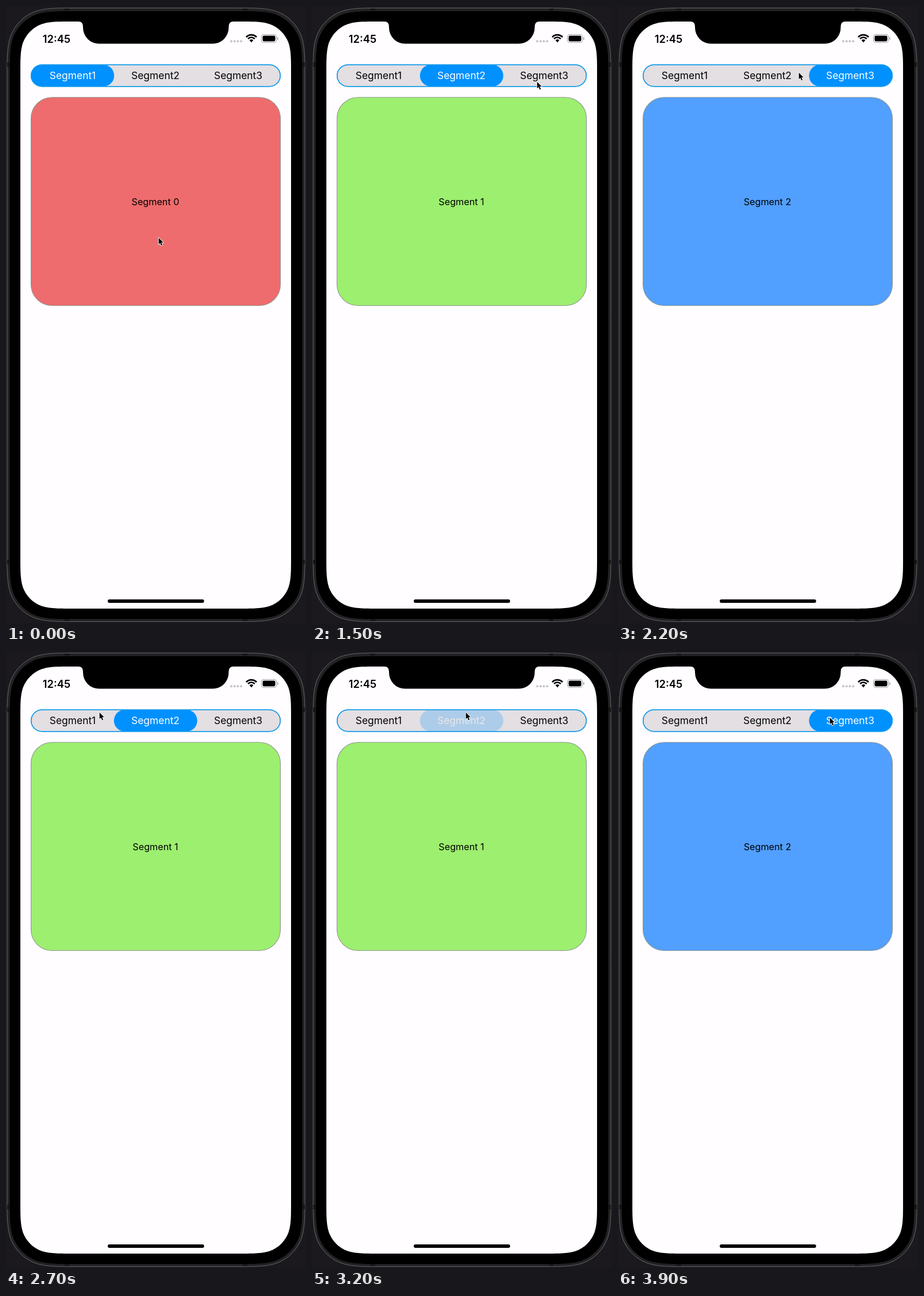
An HTML page with a canvas that plays this animation: 522 by 1072 pixels, repeating every 4000 ms.

```html
<!DOCTYPE html>
<html lang="en">
<head>
<meta charset="utf-8">
<title>Segmented control</title>
<style>
  html, body { margin: 0; width: 100%; height: 100%; overflow: hidden; background: #1b191e; }
  canvas { display: block; width: 522px; height: 1072px; }
</style>
</head>
<body>
<canvas id="stage" width="522" height="1072"></canvas>
<script>
const ctx = document.getElementById('stage').getContext('2d');
const LOOP = 4000, STEP = 100;
const FONT = 'Inter, Roboto, sans-serif';
const BAR = [227, 223, 226], BLUE = [0, 145, 255], WHITE = [255, 255, 255], BLACK = [0, 0, 0];
const PANELS = ['#ee6c6d', '#9def6f', '#519fff'];

// A press dims the button; releasing it selects the tab and fades it back in.
const clicks = [
  { press: 1100, release: 1200, tab: 1 },
  { press: 1600, release: 1700, tab: 2 },
  { press: 2300, release: 2400, tab: 1 },
  { press: 2800, release: 2900, tab: 0 },
  { press: 3100, release: 3200, tab: 1 },
  { press: 3500, release: 3600, tab: 2 }
];
const DIM = 0.24, FADE = 300;

// Pointer path: time, x, y
const path = [
  [0, 265, 402], [300, 300, 282], [600, 332, 152], [1000, 285, 130],
  [1200, 284, 129], [1500, 391, 131], [1700, 397, 129], [1900, 392, 124],
  [2200, 314, 115], [2400, 284, 114], [2700, 162, 106], [2900, 136, 108],
  [3200, 267, 106], [3600, 366, 114], [3900, 368, 115], [4000, 368, 115]
];

function paint(fill, stroke, width = 1) {
  if (fill) { ctx.fillStyle = fill; ctx.fill(); }
  if (stroke) { ctx.strokeStyle = stroke; ctx.lineWidth = width; ctx.stroke(); }
}

function box(x, y, w, h, r, fill, stroke, width) {
  ctx.beginPath();
  ctx.roundRect(x, y, w, h, r);
  paint(fill, stroke, width);
}

// Rectangle whose corners ease into the straight edges.
function smoothBox(x, y, w, h, r, fill, stroke) {
  ctx.beginPath();
  const corner = (cx, cy, ax, ay, bx, by) => {
    // a: direction along the incoming edge, b: along the outgoing edge
    const at = (a, b) => [cx + (ax * a + bx * b) * r, cy + (ay * a + by * b) * r];
    ctx.lineTo(...at(1.529, 0));
    ctx.bezierCurveTo(...at(1.088, 0), ...at(0.868, 0), ...at(0.631, 0.075));
    ctx.bezierCurveTo(...at(0.373, 0.169), ...at(0.169, 0.373), ...at(0.075, 0.631));
    ctx.bezierCurveTo(...at(0, 0.868), ...at(0, 1.088), ...at(0, 1.529));
  };
  corner(x, y, 0, 1, 1, 0);
  corner(x + w, y, -1, 0, 0, 1);
  corner(x + w, y + h, 0, -1, -1, 0);
  corner(x, y + h, 1, 0, 0, -1);
  ctx.closePath();
  paint(fill, stroke);
}

function label(str, x, y, size, color = '#000', weight = 400) {
  ctx.font = `${weight} ${size}px ${FONT}`;
  ctx.textAlign = 'center';
  ctx.fillStyle = color;
  ctx.fillText(str, x, y);
}

function mix(from, to, k) {
  return `rgb(${from.map((c, i) => Math.round(c + (to[i] - c) * k))})`;
}

function drawDevice() {
  ctx.fillStyle = '#1b191e';
  ctx.fillRect(0, 0, 522, 1072);
  smoothBox(2, 3.5, 518, 1066, 78, '#222224', '#68686b');
  ctx.fillStyle = '#161617';
  for (const x of [102, 412]) {
    ctx.fillRect(x, 4, 8, 4);
    ctx.fillRect(x, 1065, 8, 4);
  }
  for (const y of [98, 962]) {
    ctx.fillRect(2, y, 4, 8);
    ctx.fillRect(516, y, 4, 8);
  }
  smoothBox(6.5, 9, 509, 1056, 74, '#000');
  smoothBox(25, 27, 471, 1020, 58.7, '#fffdff');
}

function drawNotch() {
  ctx.beginPath();
  ctx.moveTo(126, 26);
  ctx.lineTo(126, 27);
  ctx.quadraticCurveTo(134, 27, 134, 36);
  ctx.arcTo(134, 65.6, 162, 65.6, 28);
  ctx.arcTo(387.5, 65.6, 387.5, 36, 28);
  ctx.lineTo(387.5, 36);
  ctx.quadraticCurveTo(387.5, 27, 395.5, 27);
  ctx.lineTo(395.5, 26);
  paint('#000');
}

function drawStatus() {
  label('12:45', 88, 63.5, 18.3, '#000', 600);
  for (let i = 0; i < 4; i++) box(390 + i * 5.7, 59.3, 4, 4, 2, '#c3c3c5');

  for (const r of [12.3, 8]) {
    ctx.beginPath();
    ctx.arc(427, 62.5, r, -Math.PI * 0.76, -Math.PI * 0.24);
    paint(null, '#000', 2.7);
  }
  ctx.beginPath();
  ctx.moveTo(427, 63.5);
  ctx.arc(427, 62.5, 4.6, -Math.PI * 0.76, -Math.PI * 0.24);
  paint('#000');

  box(444.5, 49.5, 26, 14, 4.3, null, '#a2a2a4', 1.1);
  box(446.5, 51.5, 22, 10, 2.4, '#000');
  box(472, 54, 1.6, 5, 0.8, '#a2a2a4');
  box(177, 1031, 167.7, 6, 3, '#000');
}

function stateAt(t) {
  const s = { tab: 0, alpha: [1, 1, 1] };
  for (const c of clicks) {
    if (t < c.press) break;
    if (t < c.release) {
      s.alpha[c.tab] = DIM;
    } else {
      s.tab = c.tab;
      s.alpha[c.tab] = Math.min(1, DIM + (1 - DIM) * (t - c.release) / FADE);
    }
  }
  return s;
}

function drawTabs({ tab, alpha }) {
  box(43.7, 102.2, 433.6, 37.6, 18.8, mix(BAR, BAR, 0), '#159bea', 1.4);
  for (let i = 0; i < 3; i++) {
    const on = i === tab;
    if (on) box(43.2 + i * 144.6, 102, 145, 37.8, 18.9, mix(BAR, BLUE, alpha[i]));
    // Pill and text fade as one group over the bar.
    label('Segment' + (i + 1), 116 + i * 144, 127.2, 17.4, mix(BAR, on ? WHITE : BLACK, alpha[i]));
  }
  box(43.7, 102.2, 433.6, 37.6, 18.8, null, '#159bea', 1.4);
}

function drawPanel(tab) {
  box(43.5, 158.8, 434, 361.7, 36.5, PANELS[tab], '#8f9692', 1.1);
  label('Segment ' + tab, 260, 345.7, 16.2);
}

function pointerAt(t) {
  const i = path.findIndex(p => p[0] > t);
  const [t0, x0, y0] = path[i - 1], [t1, x1, y1] = path[i];
  const u = (t - t0) / (t1 - t0);
  const k = u * u * (3 - 2 * u);
  return [x0 + (x1 - x0) * k, y0 + (y1 - y0) * k];
}

function drawPointer([x, y]) {
  ctx.save();
  ctx.translate(x + 0.7, y + 0.8);
  ctx.beginPath();
  ctx.moveTo(0, 0);
  for (const [px, py] of [[0, 11.4], [2.6, 9], [4.5, 13.4], [6.4, 12.6], [4.6, 8.3], [8.1, 8.1]])
    ctx.lineTo(px, py);
  ctx.closePath();
  ctx.lineJoin = 'round';
  paint(null, '#fff', 1.8);
  paint('#000');
  ctx.restore();
}

function render(t) {
  const state = stateAt(t);
  drawDevice();
  drawNotch();
  drawStatus();
  drawTabs(state);
  drawPanel(state.tab);
  drawPointer(pointerAt(t));
}

const start = performance.now();
function tick() {
  const t = (performance.now() - start) % LOOP;
  render(Math.floor(t / STEP) * STEP);
  requestAnimationFrame(tick);
}
tick();
</script>
</body>
</html>
```
